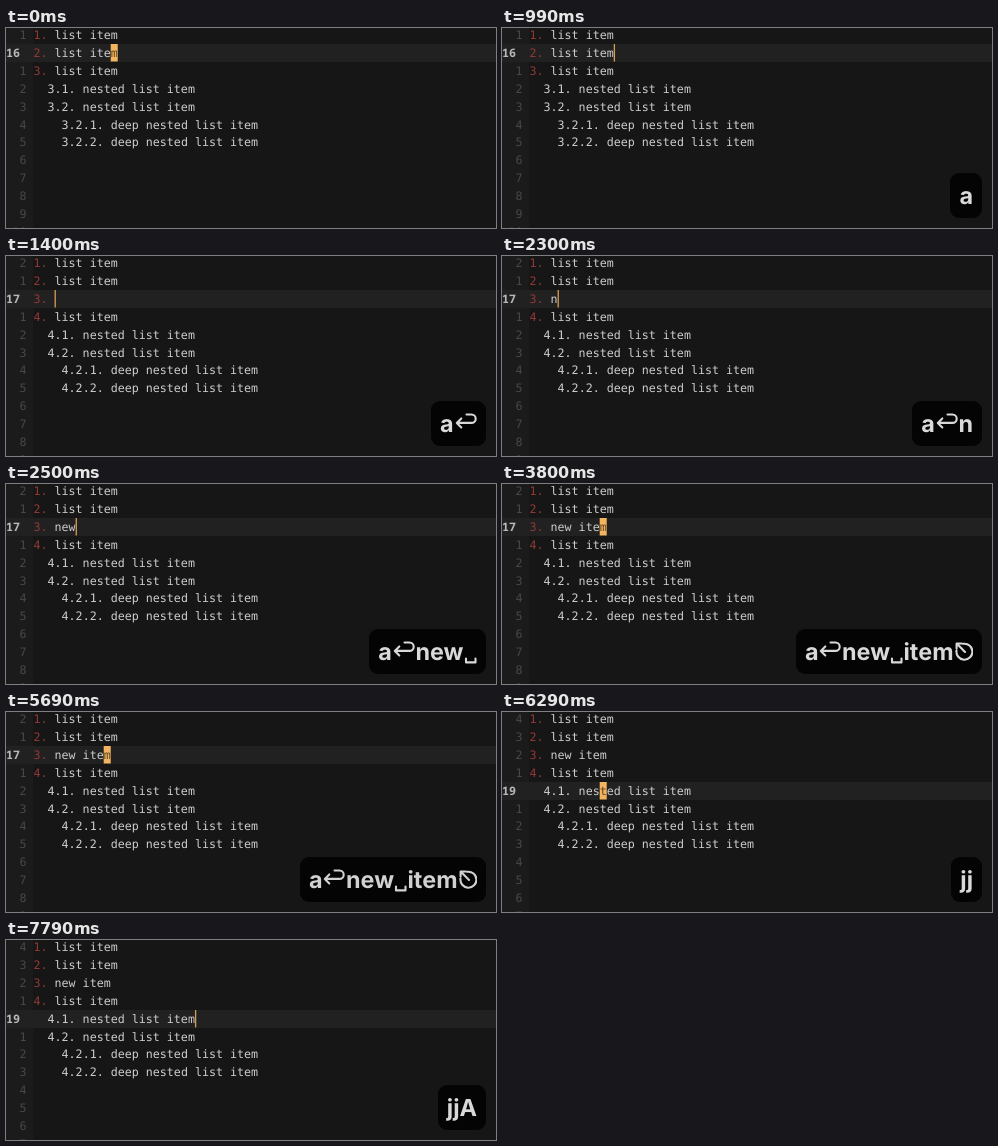
Write an HTML page that moves like this. It is 490 px wide and 200 px high and loops after 8000 ms.

```html
<!DOCTYPE html>
<html lang="en">
<head>
<meta charset="utf-8">
<title>Numbered list editing</title>
<style>
  html, body { margin: 0; width: 100%; height: 100%; overflow: hidden; background: #161616; }
  #stage { position: relative; width: 490px; height: 200px; overflow: hidden; }
  #editor { position: absolute; left: 0; top: 0; display: block; }
  #editor text {
    font: 11.66px "DejaVu Sans Mono", monospace;
    white-space: pre;
    text-rendering: geometricPrecision;
  }
  #editor .current { font: 600 11.7px "Noto Sans Mono", monospace; }
  #keys {
    position: absolute; right: 10px; top: 145px; height: 45px; padding: 0 9px;
    display: flex; border-radius: 9px; background: #040404; color: #d9d9d9;
    font: 700 23.4px/45px Inter, sans-serif; white-space: pre;
    text-rendering: geometricPrecision;
  }
  #keys svg {
    display: block; flex: none; fill: none; stroke: currentColor;
    stroke-width: 2.1; stroke-linecap: round; stroke-linejoin: round;
  }
</style>
</head>
<body>
<div id="stage">
  <svg id="editor" width="490" height="200" viewBox="0 0 490 200"></svg>
  <div id="keys"></div>
</div>
<script>
const LOOP = 8000, ROWS = 12, FIRST = 15;
const CHAR = 7.02, PITCH = 17.9, GUTTER = 27, LEFT = 27.5;
const INK = '#cecece', RED = '#923936', DIM = '#484848', ORANGE = '#f4b45f';

const editor = document.getElementById('editor');
const keys = document.getElementById('keys');

// time, cursor row, cursor column, insert mode, new item text, pressed keys, overlay opacity
const steps = [
  [0, 1, 11, false, null, '', 0],
  [800, 1, 12, true, null, 'a', 0.35],
  [900, 1, 12, true, null, 'a', 0.8],
  [990, 1, 12, true, null, 'a', 1],
  [1300, 1, 12, true, null, 'a↩', 1],
  [1400, 2, 3, true, '', 'a↩', 1],
  ...typing(),
  [3700, 2, 11, true, 'new item', 'a↩new␣item⎋', 1],
  [3800, 2, 10, false, 'new item', 'a↩new␣item⎋', 1],
  [5690, 2, 10, false, 'new item', 'a↩new␣item⎋', 0.96],
  [5790, 2, 10, false, 'new item', 'a↩new␣item⎋', 0.4],
  [5890, 2, 10, false, 'new item', '', 0],
  [6090, 2, 10, false, 'new item', 'j', 0.6],
  [6190, 3, 10, false, 'new item', 'jj', 1],
  [6290, 4, 10, false, 'new item', 'jj', 1],
  [7690, 4, 10, false, 'new item', 'jjA', 1],
  [7790, 4, 23, true, 'new item', 'jjA', 1]
];

// The key display runs slightly ahead of the buffer.
function typing() {
  const word = 'new item';
  const shown = [1, 3, 4, 5, 6, 6, 7, 8, 8];
  const typed = [1, 2, 3, 4, 5, 6, 6, 7, 8];
  return shown.map((n, i) => [
    2300 + i * 100, 2, 3 + typed[i], true, word.slice(0, typed[i]),
    'a↩' + word.slice(0, n).replace(' ', '␣'), 1
  ]);
}

// width and path of each key symbol
const icons = {
  '↩': [23.5, 'M12.5 13.5H17.5a4.2 4.2 0 0 1 0 8.4H3M7.3 17.4 2.8 21.9 7.3 26.4'],
  '␣': [13.5, 'M2 29.5V33.4H11.5V29.5'],
  '⎋': [19.5, 'M9.2 14.8A8 8 0 1 1 2.5 21.5M11 22.9 3.2 15.1M2.6 19.6V14.5H7.7']
};

function buildLines(added) {
  const items = ['list item', 'list item'];
  if (added !== null) items.push(added);
  items.push('list item');
  const n = items.length;
  return [
    ...items.map((s, i) => `${i + 1}. ${s}`),
    `  ${n}.1. nested list item`,
    `  ${n}.2. nested list item`,
    `    ${n}.2.1. deep nested list item`,
    `    ${n}.2.2. deep nested list item`
  ];
}

const rect = (x, y, w, h, fill) =>
  `<rect x="${x}" y="${y}" width="${w}" height="${h}" fill="${fill}"/>`;
const text = (x, row, fill, str, cls = '') =>
  `<text x="${x}" y="${11 + row * PITCH}" fill="${fill}" class="${cls}" xml:space="preserve">${str}</text>`;
const rowTop = row => Math.round(-2 + row * PITCH);

function drawEditor(row, col, insert, added) {
  const lines = buildLines(added);
  const top = rowTop(row);
  const x = LEFT + col * CHAR;
  let out = rect(0, 0, 490, 200, '#161616') + rect(0, 0, GUTTER, 200, '#1b1b1b')
    + rect(0, top, 490, 18, '#212121');

  for (let r = 0; r < ROWS; r++) {
    if (r === row) {
      out += text(0, r, '#b8b8b8', FIRST + r, 'current');
    } else {
      const num = String(Math.abs(r - row));
      out += text(20.4 - num.length * CHAR, r, DIM, num);
    }
  }
  lines.forEach((line, r) => {
    const mark = line.match(/^\d+\./);
    const cut = mark ? mark[0].length : 0;
    if (cut) out += text(LEFT, r, RED, mark[0]);
    const start = line.slice(cut).search(/\S/);
    if (start >= 0) out += text(LEFT + (cut + start) * CHAR, r, INK, line.slice(cut + start));
  });

  if (insert) {
    out += rect(x, top, 1.3, 17.5, '#d29c54');
  } else {
    out += rect(x, top, CHAR, 17.5, ORANGE) + text(x, row, '#5c431f', lines[row][col]);
  }
  editor.innerHTML = out;
}

function drawKeys(str, opacity) {
  keys.style.opacity = opacity;
  keys.innerHTML = (str.match(/[↩␣⎋]|[^↩␣⎋]+/g) || []).map(part => {
    const icon = icons[part];
    return icon
      ? `<svg width="${icon[0]}" height="45"><path d="${icon[1]}"/></svg>`
      : `<span>${part}</span>`;
  }).join('');
}

let shownStep = -1;
function frame() {
  const t = performance.now() % LOOP;
  let i = steps.length - 1;
  while (steps[i][0] > t) i--;
  if (i !== shownStep) {
    shownStep = i;
    const [, row, col, insert, added, pressed, opacity] = steps[i];
    drawEditor(row, col, insert, added);
    drawKeys(pressed, opacity);
  }
  requestAnimationFrame(frame);
}
frame();
</script>
</body>
</html>
```
